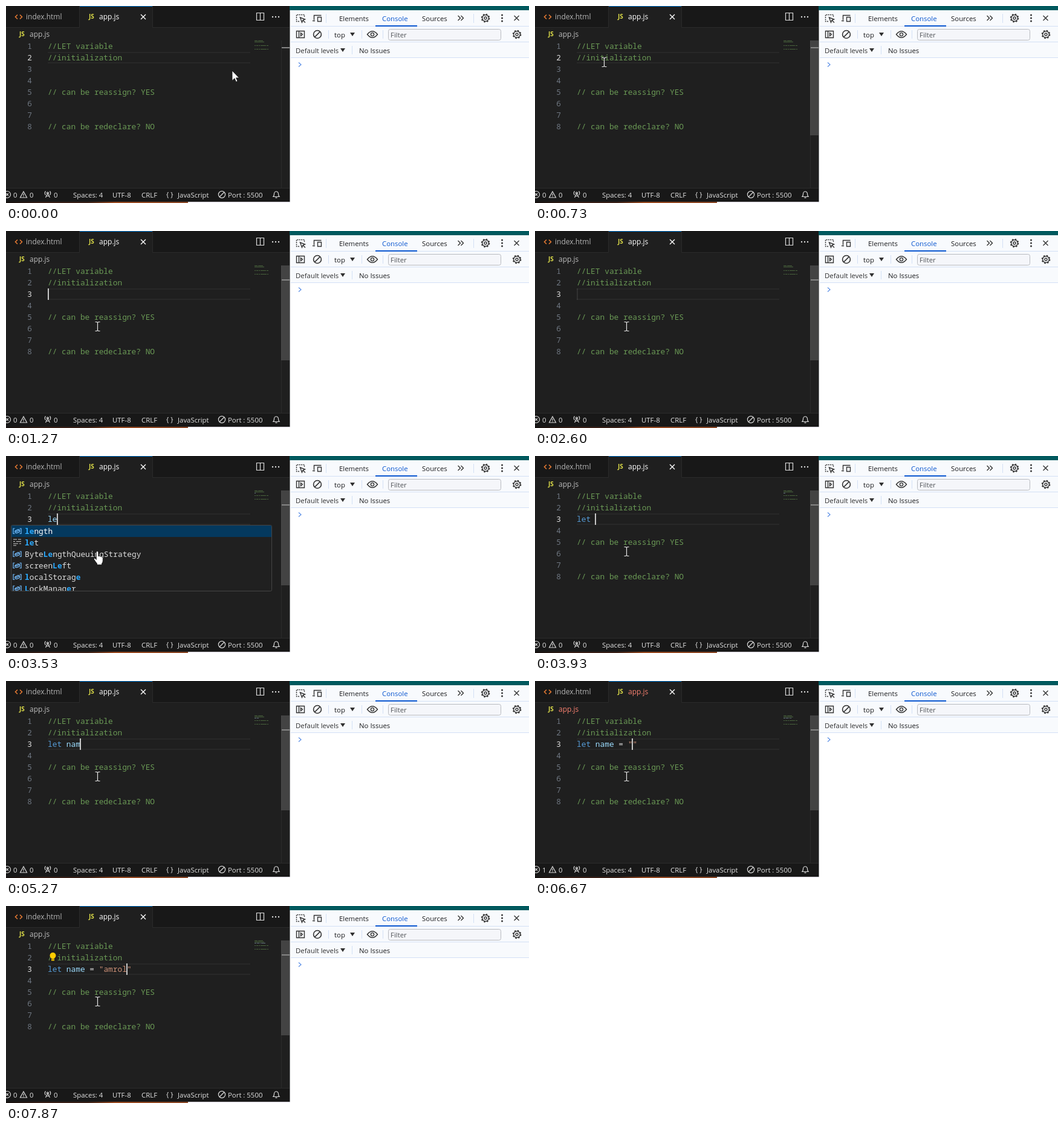
An HTML page that plays this animation: 865x326 px, repeating every 8 s.

```html
<!DOCTYPE html>
<html lang="en">
<head>
<meta charset="utf-8">
<title>Editor and console</title>
<style>
  html, body { margin: 0; width: 100%; height: 100%; overflow: hidden; background: #1f1f1f; }
  svg { display: block; width: 865px; height: 326px; }
  text { white-space: pre; }
  .ui { font: 11.4px "Open Sans", "Noto Sans", sans-serif; }
  .label { font: 12px "Open Sans", "Noto Sans", sans-serif; }
  .js { font: bold 10px "Open Sans", "Noto Sans", sans-serif; fill: #dcdc48; }
  .mono { font: 12.83px "Noto Sans Mono", "DejaVu Sans Mono", monospace; }
  .num { fill: #6e7681; text-anchor: end; }
  .num.on { fill: #ddd; }
  #list { font-weight: 500; }
  .hit { fill: #2aaaff; font-weight: 700; }
  .line { fill: none; stroke: currentColor; stroke-width: 1.2; }
  .error { fill: #f88070 !important; }
  [hidden] { display: none; }
</style>
</head>
<body>
<svg viewBox="0 0 865 326">
  <defs>
    <g id="ban"><circle r="5.6"/><path d="M-4 4L4-4"/></g>
    <g id="gear">
      <circle r="5.3"/><circle r="2"/>
      <circle r="6.4" stroke-width="1.8" stroke-dasharray="2.5 2.53"/>
    </g>
    <clipPath id="listClip"><rect x="9" y="115" width="430" height="108"/></clipPath>
    <linearGradient id="under">
      <stop offset="0" stop-color="#15110f"/>
      <stop offset=".2" stop-color="#3a2118"/>
      <stop offset=".45" stop-color="#3a2118"/>
      <stop offset=".6" stop-color="#9a4a20"/>
      <stop offset="1" stop-color="#8a4828"/>
    </linearGradient>
  </defs>

  <!-- editor -->
  <rect width="469" height="326" fill="#1f1f1f"/>
  <rect width="469" height="35" fill="#181818"/>
  <path d="M0 35.5H121.5V0M242.5 0V35.5H469" class="line" color="#2b2b2b" style="stroke-width:1"/>
  <rect x="122" width="120" height="36" fill="#1f1f1f"/>
  <rect x="122" width="120" height="1" fill="#0078d4"/>
  <path d="M19 14.5L15.5 18 19 21.5M23 14.5L26.5 18 23 21.5" class="line" color="#e37933" style="stroke-width:1.6"/>
  <text class="label" x="33" y="22" fill="#b4b4b4">index.html</text>
  <text class="js" x="137" y="21">JS</text>
  <text class="label file" x="154" y="22" fill="#fff">app.js</text>
  <path d="M223 14L231 22M231 14L223 22" class="line" color="#fff" style="stroke-width:1.4"/>
  <path d="M414.5 11.5H426.5V23.5H414.5ZM420.5 11.5V23.5" class="line" color="#ddd"/>
  <g fill="#ddd"><circle cx="441" cy="18" r="1.2"/><circle cx="446" cy="18" r="1.2"/><circle cx="451" cy="18" r="1.2"/></g>
  <text class="js" x="22" y="50">JS</text>
  <text class="label file" x="39" y="51" fill="#bcbcbc">app.js</text>

  <path id="rowEdge" d="M69 77H404M69 94H404" class="line" color="#282828" style="stroke-width:2"/>
  <g id="code" class="mono"></g>
  <text id="typed" class="mono" x="69" y="109"></text>
  <g id="map" opacity=".55"></g>
  <g id="mapTyped" opacity=".55"></g>
  <rect id="caret" y="95" width="2" height="19" fill="#c8c8c8"/>
  <g id="bulb">
    <rect x="75" y="77" width="8" height="16" fill="#1f1f1f"/>
    <circle cx="77.500" cy="82" r="5" fill="#fc0"/>
    <path d="M75 85H80V90.500H75Z" fill="#fc0"/>
    <path d="M75 88H80" class="line" color="#1f1f1f" style="stroke-width:.7"/>
  </g>
  <path d="M455.500 57V301" class="line" color="#2b2b2b" style="stroke-width:1"/>
  <rect id="slider" x="455" y="57" width="14" height="157" fill="#797979" opacity=".4"/>
  <rect id="mark" x="456" width="13" height="2" fill="#868686"/>

  <rect y="301" width="469" height="23" fill="#181818"/>
  <rect y="301" width="469" height="1" fill="#2b2b2b"/>
  <g class="ui" fill="#e2e2e2">
    <text id="errors" x="12" y="316.5">0</text>
    <text x="39" y="316.5">0</text>
    <text x="79" y="316.5">0</text>
    <text x="111" y="316.5">Spaces: 4</text>
    <text x="176" y="316.5">UTF-8</text>
    <text x="224" y="316.5">CRLF</text>
    <text x="265" y="316">{ }</text>
    <text x="284" y="316.5">JavaScript</text>
    <text x="367" y="316.5">Port : 5500</text>
  </g>
  <g class="line" color="#d8d8d8">
    <circle cx="2" cy="312" r="5.5"/><path d="M0 310L4 314M4 310L0 314"/>
    <path d="M29 307L34.5 317H23.5ZM29 310.5V314M29 315V316"/>
    <path d="M65.5 317L69 310L72.5 317M67 314.5H71M65.5 306.5Q63 309.5 65.5 313M72.5 306.5Q75 309.5 72.5 313"/>
    <circle cx="69" cy="309.5" r="1.5"/>
    <use href="#ban" x="357" y="312"/>
    <path d="M442 315.5Q443.5 314 443.5 311A3.5 4 0 0 1 450.5 311Q450.5 314 452 315.5ZM445.5 317.3H448.5"/>
  </g>
  <rect y="324" width="301" height="2" fill="url(#under)"/>
  <rect x="301" y="324" width="170" height="2" fill="#eeedf2"/>

  <!-- console -->
  <rect x="469" width="396" height="8" fill="#00595e"/>
  <rect x="469" y="7" width="1" height="317" fill="#808284"/>
  <rect x="470" y="7" width="395" height="319" fill="#fff"/>
  <rect x="471" y="7" width="394" height="78" fill="#f8fafd"/>
  <path d="M471 33.5H865M471 59.5H865M471 85.5H865M529.5 13V28M773.5 13V28M533.5 40V54M588.5 40V54M623.5 40V54M572.5 66V80"
        class="line" color="#d3e0f5" style="stroke-width:1"/>
  <rect x="611" y="32" width="69" height="2" fill="#0b57d0"/>
  <g class="ui" fill="#1c1d1f">
    <text x="551" y="25">Elements</text>
    <text x="622" y="25" fill="#0b57d0">Console</text>
    <text x="688" y="25">Sources</text>
    <text x="543" y="51.5">top</text>
    <text x="479" y="78" fill="#303030">Default levels</text>
    <text x="584" y="78">No Issues</text>
  </g>
  <rect x="632.5" y="38.5" width="186" height="18" rx="3" fill="#f5f6fa" stroke="#b8bbc0"/>
  <text class="ui" x="636" y="52" fill="#505357">Filter</text>
  <path d="M569 44H577L573 50ZM553 70H561L557 76Z" fill="#303030"/>
  <g class="line" color="#333" style="stroke-width:1.4">
    <path d="M485 25.5H480.5V14.5H493.5V18" stroke-dasharray="2 1.3"/>
    <path d="M486.5 19L494.5 22L491 23.5L489.5 27ZM491 23.5L495 27.5"/>
    <path d="M511 24.5H507M509.5 23V15.5H521.5M515.5 18.5H521.5V25.5H515.5Z"/>
    <path d="M747.5 16L751.5 20L747.5 24M752.5 16L756.5 20L752.5 24"/>
    <path d="M840.5 16L848.5 24M848.5 16L840.5 24"/>
    <path d="M480.5 41.5H493.5V52.5H480.5ZM484.5 41.5V52.5M487.5 44.5V49.5L490.5 47Z"/>
    <use href="#ban" transform="translate(515 47) scale(1.15)"/>
    <path d="M597.5 47Q606 36.5 614.5 47Q606 57.5 597.5 47Z"/>
    <circle cx="606" cy="47" r="2.6"/>
    <use href="#gear" x="793" y="20"/>
    <use href="#gear" x="845" y="47"/>
  </g>
  <g fill="#333"><circle cx="820.5" cy="15" r="1.5"/><circle cx="820.5" cy="20" r="1.5"/><circle cx="820.5" cy="25" r="1.5"/></g>
  <path d="M484 93.5L488 97L484 100.5" class="line" color="#5a8ee6"/>

  <!-- suggestions -->
  <g id="popup">
    <rect x="8.5" y="114.5" width="431" height="109" rx="2" fill="#202020" stroke="#454545"/>
    <rect x="9" y="115" width="430" height="19" fill="#04395e"/>
    <g id="list" class="mono" clip-path="url(#listClip)"></g>
  </g>

  <!-- pointer -->
  <g id="pointer">
    <path id="arrow" d="M0 0V16.5L4 12.8L6.5 18.5L9 17.4L6.5 11.9H11.5Z" fill="#fff" stroke="#111" stroke-width=".8"/>
    <path id="beam" d="M-3.5-7.5H-1L.5-6.5L2-7.5H4.5M.5-6.5V6.5M-3.5 7.5H-1L.5 6.5L2 7.5H4.5" class="line" color="#e8e8e8"/>
    <path id="hand" d="M-1.7 1.5Q-1.7-.5 0-.5T1.7 1.5V8Q3.5 6.5 4.7 8.3Q6.3 7.3 7.2 9Q9.3 8.6 9.3 11V15Q9.3 18 7.5 20V22H-.5V20Q-3 17-5.5 13Q-6.2 10.8-4 11L-1.7 13.5Z"
          fill="#fff" stroke="#111" stroke-width=".8"/>
  </g>
</svg>

<script>
  const LOOP = 8000, LEFT = 69, ROW = 19, CARET_STEP = 7.65;
  const $ = id => document.getElementById(id);
  const show = (id, on) => $(id).toggleAttribute("hidden", !on);
  const lerp = (a, b, k) => a + (b - a) * k;
  const clamp = k => Math.min(1, Math.max(0, k));

  const lines = ["//LET variable", "//initialization", "", "", "// can be reassign? YES",
                 "", "", "// can be redeclare? NO"];

  // "<" is backspace
  const keys = [
    [3470, "l"], [3530, "e"], [3670, "t"], [3870, " "], [4070, "n"], [4130, "a"],
    [4400, "e"], [4470, "m"], [4870, "<"], [5000, "<"], [5270, "m"], [5330, "e"],
    [5600, " "], [6000, "="], [6130, " "], [6670, '"'], [6870, "a"], [7000, "m"],
    [7530, "r"], [7670, "o"], [7870, "l"]
  ];

  // parts in brackets are the matched letters
  const items = ["[le]ngth", "[le]t", "Byte[Le]ngthQueuingStrategy", "screen[Le]ft",
                 "[l]ocalStorag[e]", "[L]ockManag[e]r"];

  const mapWords = (text, row, color) =>
    [...text.matchAll(/\S+/g)].map(w =>
      `<rect x="${411 + w.index}" y="${57 + row * 2}" width="${w[0].length}" height="1" fill="${color}"/>`).join("");

  $("code").innerHTML = lines.map((s, i) => {
    const y = 71 + i * ROW;
    return `<text class="num" x="43" y="${y}">${i + 1}</text><text x="${LEFT}" y="${y}" fill="#6a9955">${s}</text>`;
  }).join("");
  $("map").innerHTML = lines.map((s, i) => mapWords(s, i, "#6a9955")).join("");

  const icon = (y, word) => word
    ? `<path class="line" color="#ccc" d="M12 ${y - 5}h6m2 0h5M12 ${y - 1.5}h3m2 0h8M12 ${y + 2}h8m2 0h3M12 ${y + 5}h5"/>`
    : `<path class="line" color="#75beff" d="M14.5 ${y - 4}h-2.5v8.5h2.5M22.5 ${y - 4}h2.5v8.5h-2.5M15 ${y}l5-2.5 2.5 1v3l-5 2-2.5-1zM15 ${y}l2.5 1 5-2.5"/>`;
  $("list").innerHTML = items.map((s, i) => {
    const y = 124 + i * ROW;
    const label = s.replace(/\[(\w+)\]/g, '<tspan class="hit">$1</tspan>');
    return icon(y, i === 1) + `<text x="31" y="${y + 5}" fill="${i ? "#dcdcdc" : "#fff"}">${label}</text>`;
  }).join("");

  const numbers = document.querySelectorAll(".num");
  const files = document.querySelectorAll(".file");

  function textAt(t) {
    let s = "";
    for (const [at, key] of keys) {
      if (t < at) break;
      s = key === "<" ? s.slice(0, -1) : s + key;
    }
    return s;
  }

  function paint(s) {
    return s.replace(/^let\b|"[^"]*"|\w+|=/g, w => {
      const color = w === "let" ? "#569cd6" : w[0] === '"' ? "#ce9178" : w === "=" ? "#d4d4d4" : "#9cdcfe";
      return `<tspan fill="${color}">${w}</tspan>`;
    });
  }

  function pointerAt(frame) {
    if (frame <= 12) {
      const k = clamp(frame / 11), j = 1 - k;
      return [lerp(374, 114, k), j * j * 107 - 20 * j * k + k * k * 93];
    }
    if (frame <= 16) return [114, lerp(93, 105, (frame - 12) / 4)];
    const k = clamp((frame - 16) / 3);
    return [lerp(114, 151, k), lerp(105, 158, k)];
  }

  let last = "";
  function draw(t) {
    const frame = Math.floor((t + 4) * 0.015);
    const focused = frame >= 16;
    const [x, y] = pointerAt(frame);
    const popup = t >= 3530 && t < 3870;
    const failing = t >= 6530 && t < 7070;

    $("pointer").setAttribute("transform", `translate(${Math.round(x)} ${Math.round(y)})`);
    show("arrow", frame < 1);
    show("beam", frame >= 1 && !popup);
    show("hand", popup);
    show("popup", popup);
    show("slider", frame >= 1);
    show("bulb", t >= 7130);

    $("rowEdge").setAttribute("transform", `translate(0 ${focused ? ROW : 0})`);
    $("mark").setAttribute("y", focused ? 80 : 68);
    numbers[1].classList.toggle("on", !focused);
    numbers[2].classList.toggle("on", focused);

    const s = textAt(t);
    const full = s.includes('"') ? s + '"' : s;
    if (full !== last) {
      $("typed").innerHTML = paint(full);
      $("mapTyped").innerHTML = mapWords(full, 2, "#9cb8cc");
      last = full;
    }
    const off = (t >= 1600 && t < 2130) || (t >= 2600 && t < 3130);
    show("caret", focused);
    $("caret").setAttribute("x", Math.floor(LEFT + s.length * CARET_STEP));
    $("caret").setAttribute("opacity", off ? 0.1 : 1);

    $("errors").textContent = failing ? "1" : "0";
    files.forEach(f => f.classList.toggle("error", failing));
  }

  const start = performance.now();
  function tick() {
    draw((performance.now() - start) % LOOP);
    requestAnimationFrame(tick);
  }
  tick();
</script>
</body>
</html>
```
